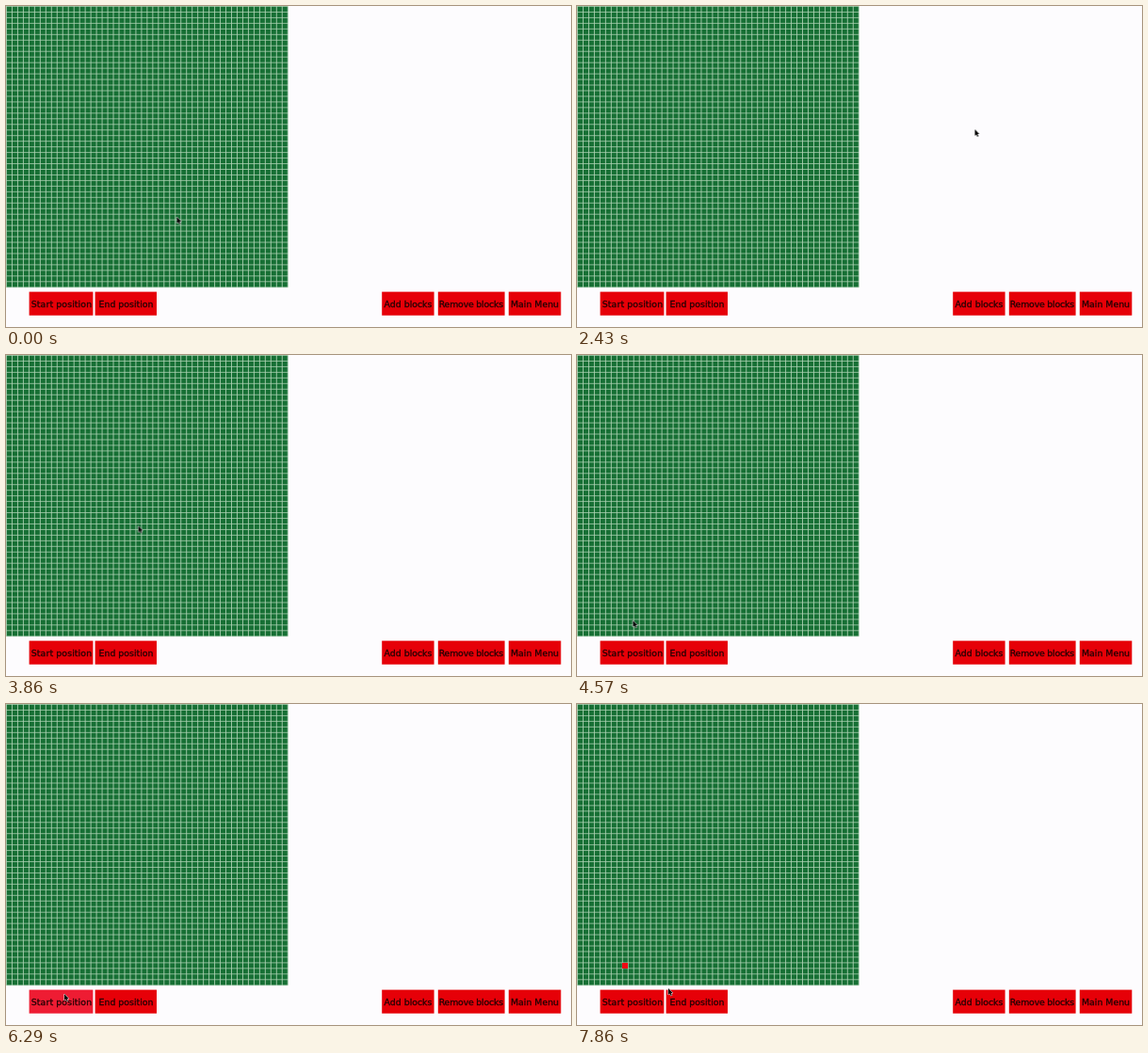
An HTML page for the animation above (8000 ms loop, 600 px wide and 341 px high).

```html
<!DOCTYPE html>
<html lang="en">
<head>
<meta charset="utf-8">
<title>Grid editor</title>
<style>
  html, body { margin: 0; width: 100%; height: 100%; overflow: hidden; background: #fdfcfe; }
  svg { display: block; width: 600px; height: 341px; }
  text { font: 9.4px "DejaVu Sans", sans-serif; text-anchor: middle; fill: #250204; stroke: #250204; stroke-width: .3px; }
  .button { fill: #e60008; }

  /* 56 ticks of 1/7 s; the small lead keeps samples clear of tick edges */
  .anim { animation: 8s -5ms linear infinite; }
  #pointer { animation-name: move; }
  #start { animation-name: hover; animation-timing-function: step-end; }
  #cell { animation-name: place; animation-timing-function: step-end; }

  @keyframes move {
    0% { transform: translate(181.5px, 224px); animation-timing-function: step-end; }
    17.857% { transform: translate(181.5px, 224px); animation-timing-function: steps(7); }
    30.357% { transform: translate(422.5px, 131px); animation-timing-function: step-end; }
    32.143% { transform: translate(422.5px, 131px); animation-timing-function: steps(5); }
    41.071% { transform: translate(205.5px, 101px); animation-timing-function: steps(9); }
    57.143% { transform: translate(59.5px, 282px); animation-timing-function: steps(1); }
    58.929% { transform: translate(59.5px, 289px); animation-timing-function: steps(5); }
    67.857% { transform: translate(62px, 308px); animation-timing-function: step-end; }
    78.571% { transform: translate(62px, 308px); animation-timing-function: steps(4); }
    85.714% { transform: translate(50px, 276px); animation-timing-function: step-end; }
    91.071% { transform: translate(50px, 276px); animation-timing-function: steps(4); }
    98.214% { transform: translate(97px, 302px); animation-timing-function: step-end; }
    100% { transform: translate(97px, 302px); }
  }
  @keyframes hover {
    0% { fill: #e60008; }
    73.214% { fill: #ee1c33; }
    82.143%, 100% { fill: #e60008; }
  }
  @keyframes place {
    0% { visibility: hidden; }
    87.5%, 100% { visibility: visible; }
  }
</style>
</head>
<body>
<svg viewBox="0 0 600 341">
  <defs>
    <pattern id="grid" width="5.975" height="5.965" patternUnits="userSpaceOnUse">
      <path fill="#166f34" d="M0 0H6V6H0z"/>
      <path fill="#b0d4b6" d="M0 0H6V.85H.85V6H0z"/>
    </pattern>
  </defs>
  <rect width="299.6" height="299.1" fill="url(#grid)"/>
  <rect id="cell" class="anim" x="48" y="275" width="6" height="6" fill="#f00814"/>

  <rect id="start" class="button anim" x="24.6" y="303.6" width="67.8" height="25.1"/>
  <rect class="button" x="94.6" y="303.6" width="65.4" height="25.1"/>
  <rect class="button" x="399.2" y="303.6" width="55.4" height="25.1"/>
  <rect class="button" x="458.8" y="303.6" width="70.8" height="25.1"/>
  <rect class="button" x="533.8" y="303.6" width="55.5" height="25.1"/>
  <text x="59" y="320.2" letter-spacing=".1">Start position</text>
  <text x="127.5" y="320.2">End position</text>
  <text x="427" y="320.2">Add blocks</text>
  <text x="493.8" y="320.2" letter-spacing="-.2">Remove blocks</text>
  <text x="561.5" y="320.2">Main Menu</text>

  <path id="pointer" class="anim" d="M0 0V7L1.6 5.6 2.7 7.9 3.9 7.3 2.8 5H4.8z" fill="#0a0a0a" stroke="#fff" stroke-width=".9" paint-order="stroke"/>
</svg>
</body>
</html>
```
